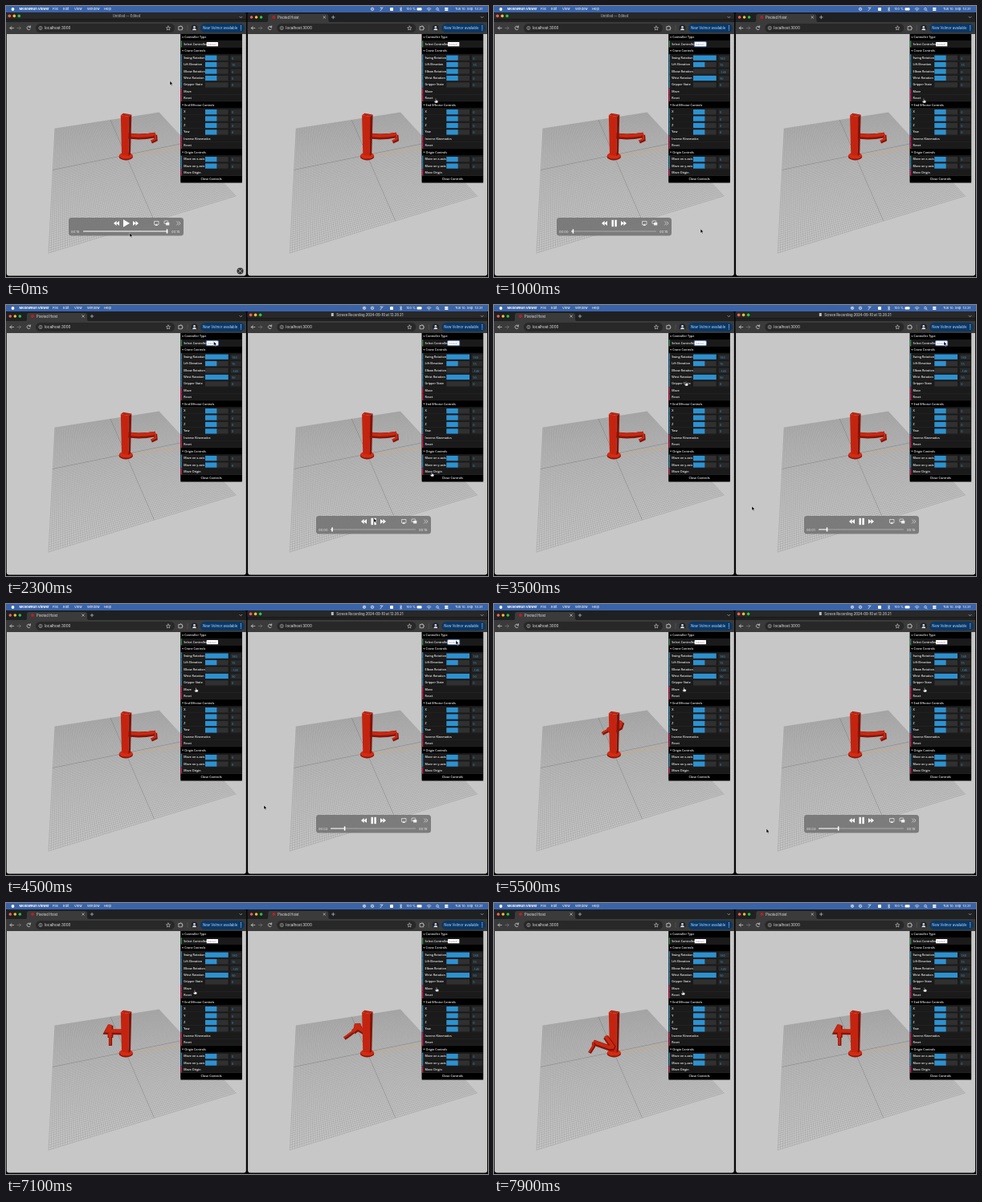
Write an HTML page that moves like this. It is 600 by 338 pixels and loops after 8 s.

```html
<!DOCTYPE html>
<html lang="en">
<head>
<meta charset="utf-8">
<title>Pivoted Hoist</title>
<style>
html, body { margin: 0; width: 100%; height: 100%; overflow: hidden; background: #050505; }
svg { display: block; }
#stage { width: 100vw; height: 100vh; }
text { font-family: Inter, Roboto, sans-serif; white-space: pre; }
.gui text { font-family: "Open Sans", "DejaVu Sans", sans-serif; font-weight: 600; }
.line { fill: none; stroke-linecap: round; stroke-linejoin: round; }
.arm { fill: none; stroke-linejoin: miter; stroke-miterlimit: 2; }
</style>
</head>
<body>
<svg id="stage" viewBox="0 0 600 338" preserveAspectRatio="none"></svg>
<script>
const LOOP = 8000;
const stage = document.getElementById('stage');

const rect = (x, y, w, h, fill, r = 0, more = '') =>
  `<rect x="${x}" y="${y}" width="${w}" height="${h}" rx="${r}" fill="${fill}" ${more}/>`;
const dot = (x, y, r, fill, more = '') =>
  `<circle cx="${x}" cy="${y}" r="${r}" fill="${fill}" ${more}/>`;
const text = (x, y, s, size, fill = '#fff', more = '') =>
  `<text x="${x}" y="${y}" font-size="${size}" fill="${fill}" ${more}>${s}</text>`;
const line = (d, stroke = '#ccc', w = .7) =>
  `<path class="line" d="${d}" stroke="${stroke}" stroke-width="${w}"/>`;
const poly = (points, fill) => `<polygon points="${points}" fill="${fill}"/>`;
const group = (id, body, more = '') => `<g id="${id}" ${more}>${body}</g>`;

// Perspective floor: unit square onto a quad
const quad = [[61, 153], [190.5, 133], [286, 237], [53, 308]];
const floor = (() => {
  const [a, b, c, d] = quad;
  const p = [b[0] - c[0], b[1] - c[1]], q = [d[0] - c[0], d[1] - c[1]];
  const s = [0, 1].map(i => a[i] - b[i] + c[i] - d[i]);
  const det = p[0] * q[1] - q[0] * p[1];
  const g = (s[0] * q[1] - q[0] * s[1]) / det;
  const h = (p[0] * s[1] - s[0] * p[1]) / det;
  return (u, v) => {
    const w = g * u + h * v + 1;
    return [0, 1].map(i => ((a[i] + (b[i] - a[i] + g * b[i]) * u + (d[i] - a[i] + h * d[i]) * v) / w).toFixed(2));
  };
})();

function grid() {
  const n = 100;
  let thin = '', mid = '';
  for (let i = 0; i <= n; i++) {
    const k = i / n;
    const d = `M${floor(k, 0)}L${floor(k, 1)}M${floor(0, k)}L${floor(1, k)}`;
    if (i === n / 2) mid = d; else thin += d;
  }
  return line(thin, '#868686', .3) + line(mid, '#707070', .55) + line('M156 187L230 175.5', '#dca766', .6);
}

const column =
  `<ellipse cx="149.3" cy="188" rx="8.7" ry="4.4" fill="#8c1609"/>` +
  `<ellipse cx="149.3" cy="186.6" rx="8.4" ry="4" fill="#d32c14"/>` +
  poly('142.8,136.3 152.8,138 152.5,187 144,185.5', '#c4240f') +
  poly('152.8,138 156.3,135.5 155,185 152.5,187', '#821408') +
  poly('142.8,136.3 146,133.8 156.3,135.5 152.8,138', '#b8240f');

const arm = id => {
  const link = (w, hi) => `<path class="arm" stroke="#841408" stroke-width="${w}"/>` +
    `<path class="arm" stroke="#c92912" stroke-width="${hi}" transform="translate(-.4 -1.1)"/>`;
  return group(id, link(6.8, 4.2) + link(4.2, 2.2));
};

// Control panel rows: kind, label, value before, value after, fill before, fill after
const rows = [
  ['head', 'Controller Type'], ['pick', 'Select Controller'],
  ['head', 'Crane Controls'],
  ['num', 'Swing Rotation', 0, 180, .5, 1], ['num', 'Lift Elevation', 15, 15, .5, .5],
  ['num', 'Elbow Rotation', 0, -145, .5, 0], ['num', 'Wrist Rotation', 0, 90, .5, 1],
  ['num', 'Gripper State', 0, 0, 0, 0], ['act', 'Move'], ['act', 'Reset'],
  ['head', 'End Effector Controls'],
  ...['X', 'Y', 'Z', 'Yaw'].map(s => ['num', s, 0, 0, .5, .5]),
  ['act', 'Inverse Kinematics'], ['act', 'Reset'],
  ['head', 'Origin Controls'],
  ['num', 'Move on x-axis', 0, 0, .5, .5], ['num', 'Move on y-axis', 0, 0, .5, .5],
  ['act', 'Move Origin'], ['end', 'Close Controls']
];
const edge = { num: '#2c86b4', act: '#cf1f58', pick: '#2f8a50' };

function panel(id) {
  const state = [['', ''], ['', '']];
  let out = rect(217.4, 35, 76.4, 184, '#1a1a1a');
  rows.forEach(([kind, label, ...v], i) => {
    const y = 39.1 + i * 8.43, top = y - 4.2;
    const head = kind === 'head' || kind === 'end';
    out += rect(217.4, top, 76.4, 8.43, head ? '#000' : '#1a1a1a') + rect(217.4, top + 8.1, 76.4, .4, '#303030');
    if (edge[kind]) out += rect(217.8, top, 1.2, 8.2, edge[kind]);
    if (kind === 'end') {
      out += text(255.5, y + 1.3, label, 3.8, '#eee', 'text-anchor="middle"');
      return;
    }
    out += text(head ? 222.3 : 221.3, y + 1.3, label, 3.65, '#eee');
    if (head) out += poly(`219,${y - .7} 221.2,${y - .7} 220.1,${y + .9}`, '#ddd');
    if (kind === 'pick') out += rect(249.7, y - 2.5, 14.3, 5.1, '#fff', .5) +
      text(251, y + 1, 'manual', 2.9, '#b9a6b4');
    if (kind === 'num') {
      out += rect(248, y - 2.8, 28.7, 6.2, '#303030') + rect(279.5, y - 2.8, 13.3, 6.2, '#292929');
      [0, 1].forEach(k => {
        state[k][0] += rect(248, y - 2.8, 28.7 * v[2 + k], 6.2, '#2c92d2');
        state[k][1] += text(281, y + 2.3, v[k], 3.9, '#2a7fae');
      });
    }
  });
  return `<g class="gui">${out}${group(id + 'Before', state[0].join(''))}${group(id + 'After', state[1].join(''))}` +
    rect(249.3, 44.6, 15, 6, 'none', .8, `id="${id}Focus" stroke="#6f9df0" stroke-width=".9"`) + '</g>';
}

const lights = (x, y) => ['#fe5f57', '#febc2e', '#28c840'].map((c, i) => dot(x + i * 6, y, 1.8, c)).join('');

function toolbar() {
  return rect(0, 20, 299, 15, '#3b3b3b') +
    line('M9.5 27.5H5M7 25.5L5 27.5L7 29.5', '#ddd') +
    line('M14 27.5H18.5M16.5 25.5L18.5 27.5L16.5 29.5', '#777') +
    line('M30.2 26.3A2.2 2.2 0 1 0 30.2 28.5M30.4 24.8V26.5H28.7', '#ddd') +
    rect(37, 22, 173, 11, '#282828', 5.5) +
    dot(43, 27.5, 2.1, 'none', 'stroke="#bbb" stroke-width=".6"') + line('M43 27.3V28.6M43 26.3V26.4', '#bbb', .6) +
    text(48, 29.1, 'localhost:3000', 4.6, '#eee') +
    line('M202 25L202.7 26.7L204.6 26.9L203.2 28.1L203.6 30L202 29L200.4 30L200.8 28.1L199.4 26.9L201.3 26.7Z', '#ccc', .6) +
    line('M215.2 25.6H217V24.9H218.2V25.6H219.3V27H220V28.2H219.3V29.8H215.2Z', '#ddd') +
    line('M226 24.5V30.5', '#666', .5) +
    dot(234.5, 27.5, 4, '#1c2430') + dot(234.5, 26.2, 1.3, '#ddd') +
    '<path d="M232 30.2a2.5 2.3 0 0 1 5 0z" fill="#ddd"/>' +
    rect(242, 22, 55, 11, '#0b3765', 5.5) +
    text(245, 29, 'New Velmor available', 4.25, '#b9dcff') +
    [25, 27.4, 29.8].map(y => dot(292.5, y, .65, '#b9dcff')).join('');
}

function topBars(id, title, icon) {
  const tab = lights(5.3, 14) +
    '<path d="M24 20Q26 20 26 18V13Q26 10 29 10H98Q101 10 101 13V18Q101 20 103 20Z" fill="#3b3b3b"/>' +
    dot(33, 14, 2, '#b82020') + text(38, 15.5, 'Pivoted Hoist', 4.2, '#e8e8e8') +
    line('M94.7 12.7L97.3 15.3M97.3 12.7L94.7 15.3', '#ddd', .6) +
    line('M105.2 14H108.8M107 12.2V15.8', '#ddd', .6);
  const movie = rect(0, 8, 299, 8.5, '#282828', 2) + rect(0, 16.3, 299, .5, '#111') +
    lights(4.3, 12.4) + (icon ? rect(104.5, 10, 3, 4, '#bbb', .5) : '') +
    text(icon ? 152.5 : 150, 13.6, title, 4.15, icon ? '#bbb' : '#999', 'text-anchor="middle" font-weight="600"');
  return rect(0, 8, 299, 13, '#1f2021', 2) + group(id + 'Tab', tab) + group(id + 'Movie', movie) +
    line('M290.8 13.3L292.3 14.8L293.8 13.3', '#ccc', .6);
}

function player(id, x, y) {
  const skip = (cx, s) => poly(`${cx},4 ${cx},10 ${cx + 3.6 * s},7`, '#fff') +
    poly(`${cx + 3.4 * s},4 ${cx + 3.4 * s},10 ${cx + 7 * s},7`, '#fff');
  return group(id + 'Player',
    rect(0, 0, 143, 22.5, '#777', 3.5, 'fill-opacity=".94"') + skip(63, -1) + skip(80, 1) +
    group(id + 'Play', poly('68,2.3 68,11.7 76,7', '#fff')) +
    group(id + 'Pause', rect(68.5, 2.8, 2.4, 8.4, '#fff') + rect(72.4, 2.8, 2.4, 8.4, '#fff')) +
    line('M107.5 8.5H106.5V4.5H112V8.5H111', '#eee') + poly('107.2,10 111.2,10 109.2,7.4', '#eee') +
    rect(119, 4, 4.7, 3.5, 'none', .4, 'stroke="#eee" stroke-width=".7"') + rect(121, 6, 4.3, 3.5, '#eee', .4) +
    line('M134.5 4.8L136.5 7L134.5 9.2M137 4.8L139 7L137 9.2', '#ddd') +
    text(3, 18.5, '00:00', 4.1, '#eee', `id="${id}Clock"`) + text(128, 18.5, '00:15', 4.1, '#eee') +
    rect(18, 16.5, 106, 1, '#a9a9a9', .5) + rect(18, 16.5, 0, 1, '#eee', .5, `id="${id}Bar"`) +
    rect(-.8, 14.3, 1.6, 5.4, '#fff', .7, `id="${id}Knob"`), `transform="translate(${x} ${y})"`);
}

const fullIcon = id => group(id + 'Full', dot(291.5, 330.5, 4, '#333') +
  line('M289.5 328.5L293.5 332.5M293.5 328.5L289.5 332.5', '#ddd', .7));

const view = (id, dx, title, icon, px, py) =>
  `<svg x="${dx}" width="299" height="338">` + rect(.8, 30, 298, 306.6, '#c7c7c7', 3) +
  topBars(id, title, icon) + toolbar() + grid() + arm(id + 'Back') + column + arm(id + 'Front') +
  panel(id) + player(id, px, py) + fullIcon(id) + '</svg>';

function menuBar() {
  const items = [[58, 'File'], [71, 'Edit'], [85, 'View'], [101, 'Window'], [122, 'Help']];
  return rect(0, 0, 600, 8, '#3a64a9') + dot(8.5, 4, 1.9, '#fff') +
    text(16.5, 5.3, 'MellowRun Viewer', 4.1, '#fff', 'font-weight="700"') +
    items.map(([x, s]) => text(x, 5.3, s, 4.1)).join('') +
    group('recording', dot(446, 3.8, 1.7, 'none', 'stroke="#fff" stroke-width=".7"') + rect(445.3, 3.1, 1.4, 1.4, '#fff')) +
    dot(456, 3.8, 1.7, 'none', 'stroke="#fff" stroke-width=".7"') + dot(456, 3.8, .6, '#fff') +
    line('M466 5.8L469 2M466 2.2H468', '#fff') + rect(478, 2, 4, 4, '#fff', .8) +
    line('M490 2.5L493 5.3L491.5 6.4V1.6L493 2.7L490 5.5', '#fff', .5) +
    text(498.5, 5.3, '100 %', 3.9) + rect(511.5, 2.2, 6, 3.4, '#fff', .8) +
    line('M524 3.3Q526.5 1.2 529 3.3M525 4.6Q526.5 3.4 528 4.6', '#fff', .6) + dot(526.5, 5.7, .5, '#fff') +
    dot(537, 3.7, 1.4, 'none', 'stroke="#fff" stroke-width=".6"') + line('M538 4.8L539.3 6.1', '#fff', .6) +
    rect(546, 2, 4.5, 1.7, '#fff', .8) + rect(546, 4.3, 4.5, 1.7, '#fff', .8) +
    text(559, 5.3, 'Tue 10. Sep  13:31', 4.1);
}

const arrow = '<path d="M0 0V5.2L1.2 4.1L2.1 6L3 5.6L2.2 3.8H3.8Z" fill="#000" stroke="#fff" stroke-width=".4"/>';
const hand = '<path d="M-.6 -2.2Q0 -2.9 .5 -2.2V-.4L2.5 .1Q3 .4 2.8 1.4L2.2 3H-.7L-2.1 1Q-2.1 .2 -1.4 .4L-.6 .9Z" fill="#fff" stroke="#111" stroke-width=".6"/>';

// Pointer tracks: shape, then [ms, x, y] stops
const pointers = [
  [arrow, [0, 154, 283], [600, 150, 270], [800, 150, 270], [1000, 257, 278], [1600, 300, 275],
    [2000, 458, 266], [2350, 458, 266], [3300, 321, 251], [5200, 321, 251], [5600, 345, 290]],
  [arrow, [0, 204, 93.5], [800, 204, 93.5]],
  [arrow, [1650, 259, 45], [3300, 258, 46]],
  [hand, [3300, 254, 60], [3500, 239, 98], [4300, 236.5, 107], [6300, 236.5, 106], [7000, 235, 111], [8000, 235, 112]],
  [hand, [0, 535, 118], [2000, 535, 118]],
  [hand, [2000, 530, 211], [2500, 530, 211]],
  [arrow, [2500, 548, 100], [2900, 560, 45.5], [5200, 560, 45.5]],
  [hand, [5200, 539, 98], [5500, 536, 107], [8000, 536, 108]]
];

stage.innerHTML = rect(0, 0, 600, 338, '#050505') +
  view('l', 0, 'Untitled — Edited', false, 78, 264) +
  view('r', 300.3, 'Screen Recording 2024-09-10 at 13.28.21', true, 85.7, 263) +
  menuBar() + pointers.map((p, i) => group('p' + i, p[0])).join('');

const $ = id => document.getElementById(id);
const show = (id, on) => { $(id).style.display = on ? '' : 'none'; };

// Arm poses: shoulder, two elbow points, wrist, gripper, tip
const poses = [
  [152, 162, 165, 163, 175, 162.5, 186, 161, 186.5, 167, 181, 169.5],
  [150, 158, 157, 154, 159, 148, 142, 158, 138, 160, 135, 162],
  [149, 163, 134, 154, 141, 153.5, 132, 161, 124, 167, 121, 169],
  [147, 161, 126, 160.5, 130, 153, 130, 168, 130, 173, 130, 178],
  [139, 167, 149, 181, 144, 181, 124, 174, 124, 179, 119, 187]
];

function drawArm(id, start, t) {
  const k = Math.max(0, Math.min(3.9999, (t - start) / 800));
  const i = Math.floor(k), f = k - i;
  const p = poses[i].map((v, j) => (v + (poses[i + 1][j] - v) * f).toFixed(2));
  const links = 'M' + p.slice(0, 8).join(' '), grip = 'M' + p.slice(6).join(' ');
  const front = k > 3.3;
  [['Back', !front], ['Front', front]].forEach(([side, on]) => {
    show(id + side, on);
    [...$(id + side).children].forEach((path, n) => path.setAttribute('d', n < 2 ? links : grip));
  });
}

function drawView(id, t, o) {
  const movie = t >= o.open && t < o.close;
  const sec = (t - o.play) / 1000;
  const playing = sec >= 0;
  show(id + 'Movie', movie);
  show(id + 'Tab', !movie);
  show(id + 'Player', movie);
  show(id + 'Full', movie && !playing);
  show(id + 'Play', !playing);
  show(id + 'Pause', playing);
  show(id + 'Before', !playing);
  show(id + 'After', playing);
  show(id + 'Focus', playing && t < o.blur);
  const done = Math.min(106, playing ? sec * 7.07 + 1 : 104.5);
  $(id + 'Bar').setAttribute('width', done);
  $(id + 'Knob').setAttribute('x', 17.2 + done);
  $(id + 'Clock').textContent = '00:' + String(playing ? Math.floor(sec) : 15).padStart(2, '0');
  drawArm(id, o.move, t);
}

function drawPointer([, ...keys], i, t) {
  const last = keys[keys.length - 1];
  const on = t >= keys[0][0] && t < last[0];
  show('p' + i, on);
  if (!on) return;
  const n = keys.findIndex(k => k[0] > t);
  const a = keys[n - 1], b = keys[n], f = (t - a[0]) / (b[0] - a[0]);
  $('p' + i).setAttribute('transform', `translate(${a[1] + (b[1] - a[1]) * f} ${a[2] + (b[2] - a[2]) * f})`);
}

const left = { open: 0, play: 800, close: 1650, blur: 4000, move: 4700 };
const right = { open: 1750, play: 2150, close: 5600, blur: 5400, move: 5500 };

function frame(now) {
  const t = now % LOOP;
  drawView('l', t, left);
  drawView('r', t, right);
  show('recording', t >= right.open);
  pointers.forEach((p, i) => drawPointer(p, i, t));
  requestAnimationFrame(frame);
}
frame(0);
</script>
</body>
</html>
```
